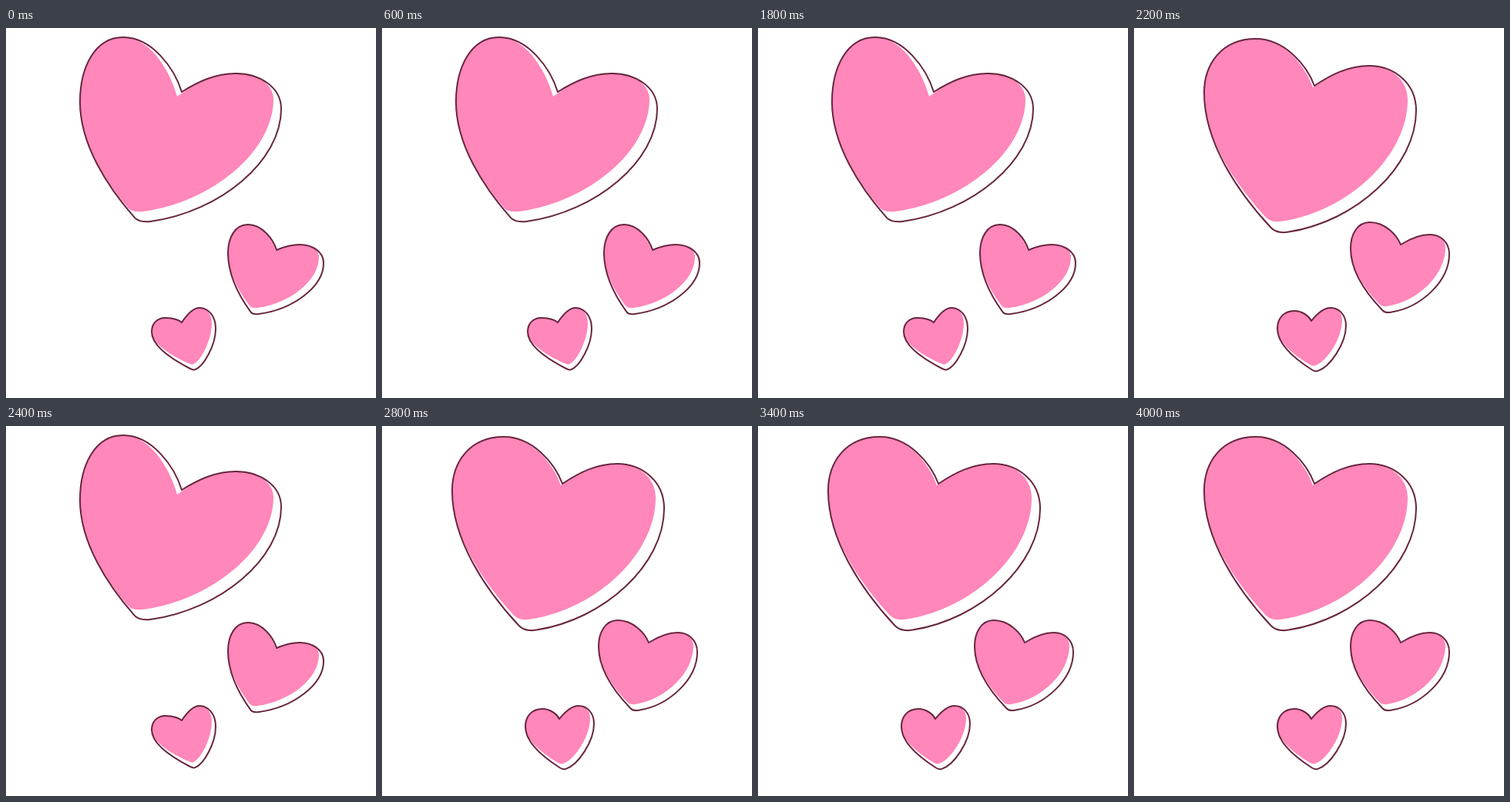
These frames come from a looping animation (480 px wide and 480 px high, 4200 ms). An HTML page:

```html
<!DOCTYPE html>
<html>
<head>
<meta charset="utf-8">
<style>
html, body { margin: 0; width: 100%; height: 100%; overflow: hidden; background: #fff; }
svg { display: block; width: 100vw; height: 100vh; }
.fill { fill: #ff87b9; }
.line { fill: none; stroke: #68263f; stroke-width: 2; stroke-linejoin: round; }
</style>
</head>
<body>
<svg id="stage" viewBox="0 0 480 480"></svg>
<script>
// A pose lists x, y of notch, left top, left side, tip, right side and right top,
// then the inset of the fill: tip x, right x, both y, and notch.
const hearts = [
  {
    nudge: -1.5, bulge: 1,
    narrow: [228, 83, 152, 12, 96, 96, 173, 253, 357, 105, 298, 59, -9, -10, -13, 6],
    wide: [234, 75, 158, 14, 91, 84, 185, 267, 366, 107, 305, 49, -7, -11, -14, 2]
  },
  {
    nudge: 0, bulge: 1,
    narrow: [351, 288, 314, 255, 288, 292, 320, 372, 412, 305, 381, 281, -1, -6, -8, 1],
    wide: [346, 281, 306, 252, 281, 286, 326, 370, 409, 293, 384, 268, -4, -5, -8, 0]
  },
  {
    nudge: 1.5, bulge: .85,
    narrow: [228, 382, 207, 376, 189, 394, 243, 444, 272, 390, 251, 363, -2, -5, -7, 0],
    wide: [230, 380, 208, 367, 186, 390, 235, 446, 275, 386, 255, 363, -3, -5, -7, 0]
  }
];

const TIP_ROUND = .15;
const mix = (a, b, k) => a + (b - a) * k;

// The point that lies kx, ky of the way from a to b.
const between = (a, b, kx, ky) => [mix(a[0], b[0], kx), mix(a[1], b[1], ky)];

function outline(notch, leftTop, left, tip, right, rightTop, bulge) {
  const tipIn = between(tip, left, .54, .3);
  const tipOut = between(tip, right, .57 * bulge, .1);
  const tipStart = between(tip, tipIn, TIP_ROUND, TIP_ROUND);
  const tipEnd = between(tip, tipOut, TIP_ROUND, TIP_ROUND);
  return `M${notch}
    C${between(notch, leftTop, .12, .42)} ${between(leftTop, notch, .5, 0)} ${leftTop}
    C${between(leftTop, left, .66, 0)} ${between(left, leftTop, 0, .53)} ${left}
    C${between(left, tip, 0, .35)} ${tipIn} ${tipStart}
    Q${tip} ${tipEnd}
    C${tipOut} ${between(right, tip, 0, .456 * bulge)} ${right}
    C${between(right, rightTop, 0, .62)} ${between(rightTop, right, .52, 0)} ${rightTop}
    C${between(rightTop, notch, .38, 0)} ${between(notch, rightTop, .3, .55)} ${notch}Z`;
}

function shapes(pose, bulge) {
  const point = i => pose.slice(2 * i, 2 * i + 2);
  const [notch, leftTop, left, tip, right, rightTop] = [0, 1, 2, 3, 4, 5].map(point);
  const [tipX, rightX, y, dent] = pose.slice(12);
  const shift = (p, dx, dy) => [p[0] + dx, p[1] + dy];
  return {
    fill: outline(shift(notch, -dent, dent), leftTop, left,
      shift(tip, tipX, y), shift(right, rightX, y), rightTop, bulge),
    line: outline(notch, leftTop, left, tip, right, rightTop, bulge)
  };
}

const stage = document.getElementById('stage');

function addPath(kind) {
  const path = document.createElementNS('http://www.w3.org/2000/svg', 'path');
  path.setAttribute('class', kind);
  stage.append(path);
  return path;
}

for (const heart of hearts) {
  heart.paths = { fill: addPath('fill'), line: addPath('line') };
}

function draw(time) {
  const step = Math.floor(time / 200) % 3;
  for (const { nudge, bulge, narrow, wide, paths } of hearts) {
    const pose = narrow.map((v, i) => mix(v, wide[i], step / 2));
    const d = shapes(pose, bulge);
    for (const kind in paths) {
      paths[kind].setAttribute('d', d[kind]);
      paths[kind].setAttribute('transform', `translate(0 ${step === 1 ? nudge : 0})`);
    }
  }
}

const start = performance.now();
function tick() {
  draw(performance.now() - start);
  requestAnimationFrame(tick);
}
tick();
</script>
</body>
</html>
```
